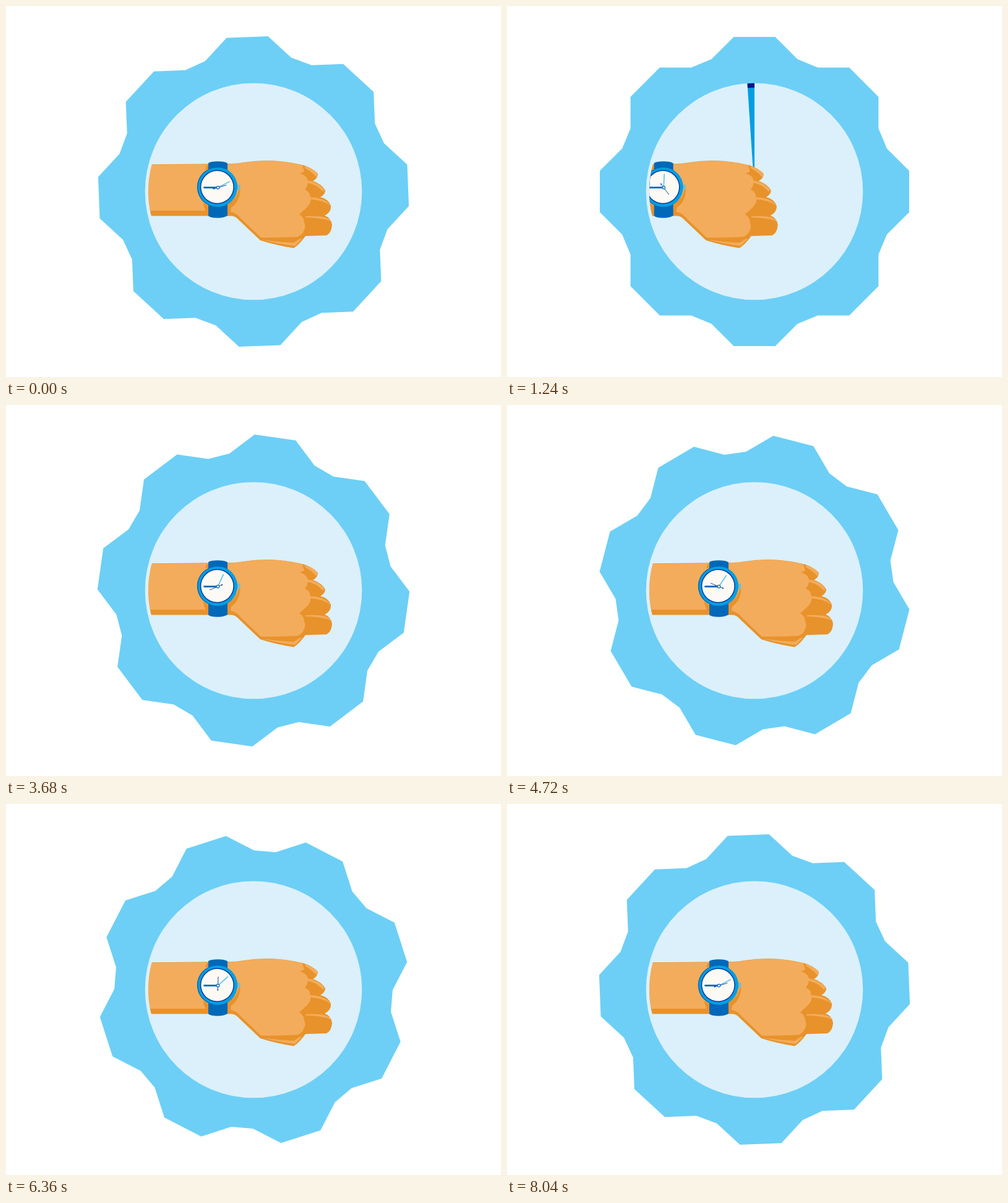
Write an HTML page with a canvas that moves like this. It is 800 by 600 pixels and loops after 8.08 s.

```html
<!DOCTYPE html>
<html lang="en">
<head>
<meta charset="utf-8">
<title>Watch badge</title>
<style>
  html, body { margin: 0; width: 100%; height: 100%; overflow: hidden; background: #fff; }
  canvas { display: block; }
</style>
</head>
<body>
<canvas id="stage" width="800" height="600"></canvas>
<script>
const ctx = document.getElementById('stage').getContext('2d');
const LOOP = 8080, STEP = 40;
const CX = 400, CY = 300, TAU = Math.PI * 2, RAD = Math.PI / 180;
const NAVY = '#00178b', BLUE = '#009fe3', SKY = '#6dcff6', PALE = '#dbf0fb';
const STRAP = '#0068b8', SKIN = '#f3ac5b', SHADE = '#e8922b';

const ease = s => s * s * (3 - 2 * s);
const run = (t, from, length) => ease(Math.min(1, Math.max(0, (t - from) / length)));

function fillCircle(x, y, r, color) {
  ctx.fillStyle = color;
  ctx.beginPath();
  ctx.arc(x, y, r, 0, TAU);
  ctx.fill();
}

function fillPath(path, color) {
  ctx.fillStyle = color;
  ctx.fill(path);
}

// Radial wipe from twelve o'clock; dir 1 is clockwise, -1 the other way.
function wipe(p, dir, draw) {
  if (p <= 0) return;
  ctx.save();
  if (p < 1) {
    const top = -Math.PI / 2;
    ctx.beginPath();
    ctx.moveTo(CX, CY);
    ctx.arc(CX, CY, 400, top, top + dir * p * TAU, dir < 0);
    ctx.closePath();
    ctx.clip();
  }
  draw();
  ctx.restore();
}

function ring(inner, outer, color) {
  ctx.strokeStyle = color;
  ctx.lineWidth = outer - inner;
  ctx.beginPath();
  ctx.arc(CX, CY, (inner + outer) / 2, 0, TAU);
  ctx.stroke();
}

function gear(angle, color) {
  const corners = [[252.2, -7.63], [252.2, 7.63], [224.9, 18], [224.9, 27]];
  ctx.beginPath();
  for (let tooth = 0; tooth < 8; tooth++) {
    for (const [r, a] of corners) {
      const phi = (a + tooth * 45 + angle) * RAD;
      ctx.lineTo(CX + r * Math.sin(phi), CY - r * Math.cos(phi));
    }
  }
  ctx.closePath();
  ctx.moveTo(CX + 175.3, CY);
  ctx.arc(CX, CY, 175.3, 0, TAU);
  ctx.fillStyle = color;
  ctx.fill('evenodd');
}

const fist = new Path2D('M200 256.5L360 255Q372 255.5 384 253Q432 245 481 257.5' +
  'Q495 262 504 271Q504 279 496 283Q509 287 516 298Q516 305 508 309Q521 312 525 323' +
  'Q526 333 515 339Q525 342 527 354Q526 367 518 371L484 372Q474 386 465 391.5' +
  'Q436 387 411 379L373 343Q369 339 362 339.5L200 339.5Z');
const palm = new Path2D('M200 257.3L360 255.5Q372 256 384 253.6Q432 246 479 257.5L482 268' +
  'Q479 269 475 270.5Q487 275 487.5 281Q489 290 483 297Q492 301 491.5 308' +
  'Q495 318 485 327L474 337Q482 342 482 350Q485 357 482 362Q478 373 468 373.5' +
  'Q440 375 412 374.5L380 344Q373 335 364 333L358 331L200 331Z');
const glints = new Path2D('M483 259Q496 263 503.5 271L502 277Q494 268 483 262Z' +
  'M487 282Q506 285 515 298L512 300Q501 288 487 286Z' +
  'M490 309Q516 310 524.5 323Q513 314 491 312.5Z' +
  'M484 340Q521 338 526 349Q516 343 484 342Z' +
  'M414 378Q442 382 465 383L474 377L479 376L467 388Q440 385 414 378Z');
const castShadow = new Path2D('M358 320Q374 312 376 296L378.5 298Q377 317 364 326' +
  'L362 337L358 339ZM324.5 257L328 257L328 264L322 264ZM318 318L328 324L328 339L325 339Z');
const strap = new Path2D('M327 254Q331 251.3 342 251.3Q354 251.3 358 254.5L358 339' +
  'Q353 342.7 342 342.7Q331 342.7 327 339.5Z');

function pointer(deg, from, to, width, color) {
  const s = Math.sin(deg * RAD), c = -Math.cos(deg * RAD);
  ctx.strokeStyle = color;
  ctx.lineWidth = width;
  ctx.beginPath();
  ctx.moveTo(342.5 + s * from, 293.6 + c * from);
  ctx.lineTo(342.5 + s * to, 293.6 + c * to);
  ctx.stroke();
}

function watch(sec) {
  fillPath(castShadow, SHADE);
  fillPath(strap, STRAP);
  ctx.fillStyle = '#86b9bd';
  ctx.fillRect(373, 289, 5.5, 8);
  fillCircle(341.2, 293, 32.4, STRAP);
  fillCircle(342.2, 293, 31.8, BLUE);
  fillCircle(341.3, 292.8, 27.6, '#0b3f9f');
  fillCircle(341.3, 292.8, 26, '#fdfaf5');

  ctx.lineCap = 'round';
  pointer(270, 2, 22, 2.8, STRAP);
  pointer(8.9 * sec - 8.5, 2, 21.3, 1.5, '#4fbdea');
  const second = 90.3 + 42.7 * sec;
  pointer(second, -8, 14, 1, '#174a9f');
  pointer(second, -7, -6.8, 2, '#174a9f');
  ctx.lineCap = 'butt';
  fillCircle(342.5, 293.6, 2.9, STRAP);
  fillCircle(342.5, 293.6, 1.7, '#fff');
}

function arm(t) {
  const p = run(t, 860, 600);
  if (p <= 0) return;
  ctx.save();
  ctx.beginPath();
  ctx.arc(CX, CY, 170, 0, TAU);
  ctx.clip();
  ctx.translate(-293 * (1 - p), 0);
  fillPath(fist, SHADE);
  fillPath(palm, SKIN);
  fillPath(glints, SKIN);
  watch(t / 1000);
  ctx.restore();
}

function draw(t) {
  ctx.fillStyle = '#fff';
  ctx.fillRect(0, 0, 800, 600);

  const pale = run(t, 418, 875);
  if (pale < 1) {
    wipe(run(t, 158, 875), 1, () => fillCircle(CX, CY, 182, BLUE));
    const inner = 172 - Math.max(0, t - 680) / 140;
    wipe(run(t, 298, 875), 1, () => ring(inner, 182, NAVY));
  }
  wipe(pale, 1, () => fillCircle(CX, CY, 182, PALE));

  const cover = run(t, 500, 720);
  if (cover < 1) {
    wipe(run(t, 216, 720), -1, () => gear(0, NAVY));
    wipe(run(t, 183, 720), -1, () => ring(184, 194, BLUE));
  }
  const turn = 2.46 * Math.pow(Math.max(0, t / 1000 - 1.5), 1.52);
  wipe(cover, -1, () => gear(turn, SKY));

  arm(t);
}

const start = performance.now();
function frame() {
  const t = Math.floor(((performance.now() - start) % LOOP) / STEP) * STEP;
  draw(t < STEP ? LOOP - STEP : t); // the loop opens on its closing pose
  requestAnimationFrame(frame);
}
frame();
</script>
</body>
</html>
```
